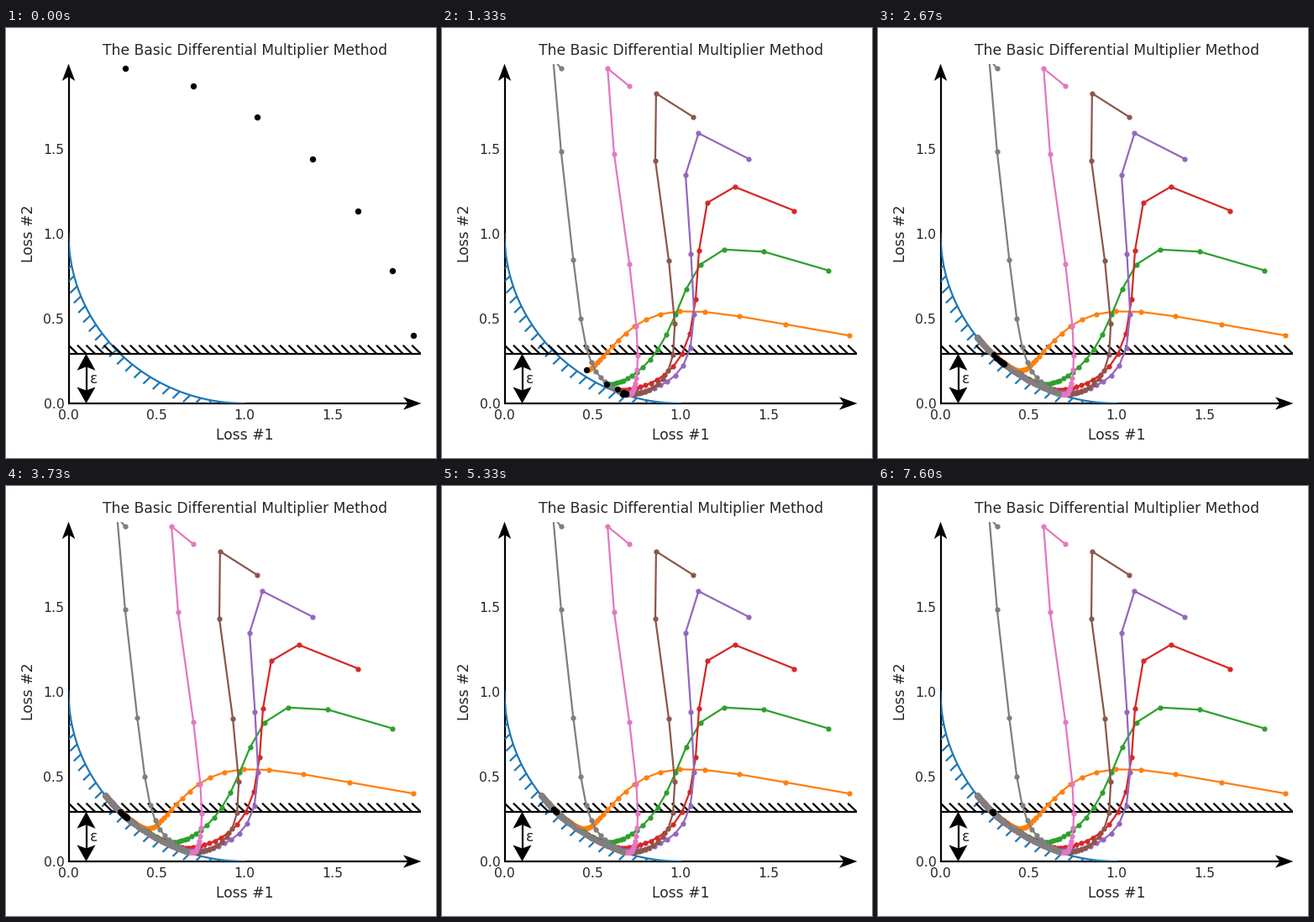
Animation, 512 px wide and 512 px high, one loop 7.66 s. Source, as a matplotlib script:

```python
import numpy as np
import matplotlib.pyplot as plt
from matplotlib.animation import FuncAnimation
from matplotlib.patches import Polygon

SIZE = 512
LOOP, TICK = 7660, 20
LEFT, RIGHT, TOP, BOTTOM = 74.5, 493.7, 43, 447
LIMIT = 2.0
EPS = 1 - np.sqrt(0.5)
HOLD, LAST, STEPS = 30, 198, 2
INK = "0.15"
LABEL, SMALL, WIDTH = 12.35, 11.3, 1.6

plt.rcParams["font.family"] = "DejaVu Sans"


def losses(v, t):
    """Two losses whose Pareto front (v = 0) is a quarter circle."""
    s = 1 + v ** 2
    return s * (1 - np.cos(t)), s * (1 - np.sin(t))


def descend(steps):
    """Gradient descent on the weights, ascent on a non-negative multiplier."""
    a = np.arange(1, 8) * np.pi / 15.6
    t = a + np.arcsin(np.cos(a) - np.sin(a))
    v = np.sqrt(2 * np.cos(a) / (1 - np.cos(t)) - 1)
    lam = np.zeros_like(a)
    path = []
    for _ in range(steps + 1):
        l1, l2 = losses(v, t)
        path.append((l1, l2))
        s = 1 + v ** 2
        dv = 2 * v * (1 - np.cos(t) + lam * (1 - np.sin(t)))
        dt = s * (np.sin(t) - lam * np.cos(t))
        v, t = v - 0.06 * dv, t - 0.02 * dt
        lam = np.maximum(lam + l2 - EPS, 0)
    return np.array(path)


def arrow_head(ax, tip, direction, length, half, notch):
    d = np.array(direction, float)
    n = np.array([-d[1], d[0]])
    tip = np.array(tip, float)
    back = tip - d * length
    ax.add_patch(Polygon([tip, back + n * half, tip - d * notch, back - n * half],
                         fc="black", ec="none"))


def shaft(ax, p, q):
    ax.plot([p[0], q[0]], [p[1], q[1]], color="black", lw=WIDTH, solid_capstyle="butt")


def barbs(ax, x, y, dx, dy, color):
    """Short slanted strokes on the forbidden side of a boundary."""
    ax.plot([x, x + dx], [y, y + dy], color=color, lw=WIDTH, solid_capstyle="butt")


fig = plt.figure(figsize=(SIZE / 100, SIZE / 100), dpi=100, facecolor="white")

# Page in pixels, y pointing down: text and arrows
page = fig.add_axes([0, 0, 1, 1], zorder=0)
page.set_xlim(0, SIZE)
page.set_ylim(SIZE, 0)
page.axis("off")

# Plot area in loss units
ax = fig.add_axes([LEFT / SIZE, 1 - BOTTOM / SIZE,
                   (RIGHT - LEFT) / SIZE, (BOTTOM - TOP) / SIZE], zorder=1)
ax.set_xlim(0, LIMIT)
ax.set_ylim(0, LIMIT)
ax.axis("off")

mid_x, mid_y = (LEFT + RIGHT) / 2, (TOP + BOTTOM) / 2
page.text(mid_x, 32, "The Basic Differential Multiplier Method",
          size=LABEL, color=INK, ha="center", va="baseline")
page.text(mid_x, 490, "Loss #1", size=LABEL, color=INK, ha="center", va="baseline")
page.text(31.5, mid_y, "Loss #2", size=LABEL, color=INK, rotation=90,
          ha="center", va="baseline", rotation_mode="anchor")
for value in (0, 0.5, 1, 1.5):
    x = LEFT + value / LIMIT * (RIGHT - LEFT)
    y = BOTTOM - value / LIMIT * (BOTTOM - TOP)
    page.text(x, 465.5, f"{value:.1f}", size=SMALL, color=INK, ha="center", va="baseline")
    page.text(69.3, y + 5.8, f"{value:.1f}", size=SMALL, color=INK, ha="right", va="baseline")

shaft(page, (LEFT, BOTTOM + 1), (LEFT, 55))
shaft(page, (LEFT - 1, BOTTOM), (482, BOTTOM))
arrow_head(page, (LEFT, 42.5), (0, -1), 20.5, 7.7, 15.5)
arrow_head(page, (494.5, BOTTOM), (1, 0), 21.5, 7.7, 16)

eps_x, eps_y = 95.5, BOTTOM - EPS / LIMIT * (BOTTOM - TOP)
shaft(page, (eps_x, eps_y + 8), (eps_x, BOTTOM - 8))
arrow_head(page, (eps_x, eps_y), (0, -1), 20, 11, 15.5)
arrow_head(page, (eps_x, BOTTOM), (0, 1), 19.5, 11, 15.5)
page.text(99.7, 423, "ε", size=LABEL, color=INK, va="baseline")

ax.plot(*losses(0, np.linspace(0, np.pi / 2, 100)), color="C0", lw=WIDTH)
barbs(ax, *losses(0, np.linspace(0, np.pi / 2, 26)), -0.04, -0.04, "C0")
ax.plot([0, LIMIT], [EPS, EPS], color="black", lw=WIDTH)
feet = np.arange(1, 41) * 0.05
barbs(ax, feet, np.full_like(feet, EPS), -0.05, 0.05, "black")

path = descend(LAST * STEPS)
trails = [ax.plot([], [], ".-", color=f"C{k + 1}", lw=WIDTH, ms=7)[0] for k in range(7)]
heads, = ax.plot([], [], "o", color="black", ms=5.3, mew=0, zorder=5)


def draw(i):
    ms = i * TICK + TICK / 2
    n = min(max(int((ms + 5) * 0.03) - HOLD, 0), LAST) * STEPS
    for k, trail in enumerate(trails):
        trail.set_data(path[:n + 1, 0, k], path[:n + 1, 1, k])
    heads.set_data(path[n, 0], path[n, 1])
    return trails + [heads]


anim = FuncAnimation(fig, draw, frames=LOOP // TICK, interval=TICK,
                     init_func=lambda: draw(0), repeat=True, repeat_delay=0)
plt.show()
```
